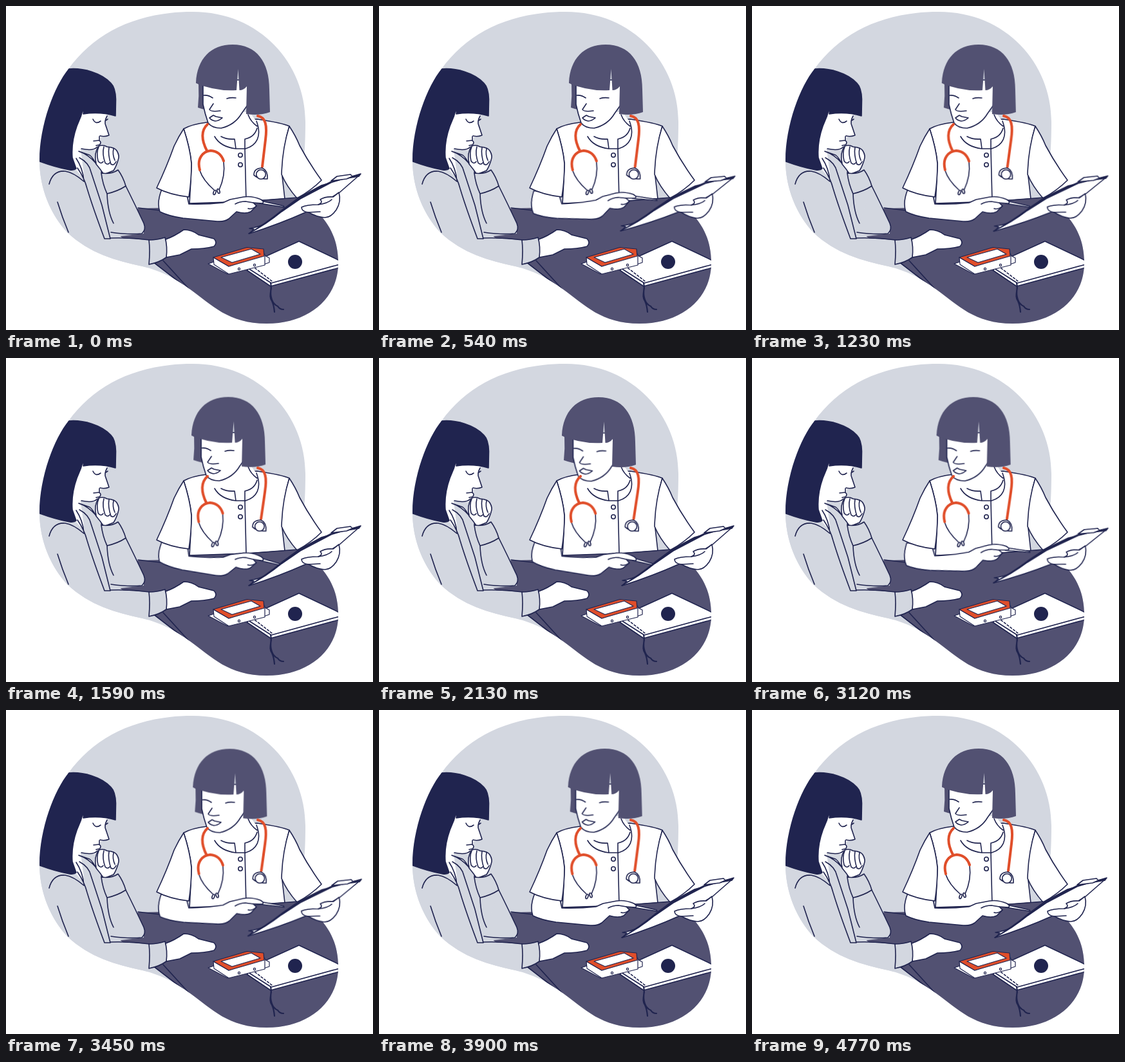
Recreate the animation shown at these times as an HTML page. Size 570 by 504 pixels, loop 4.8 s.

```html
<!DOCTYPE html>
<html lang="en">
<head>
<meta charset="utf-8">
<title>Consultation</title>
<style>
html, body { margin: 0; width: 100%; height: 100%; overflow: hidden; background: #fff; }
svg { display: block; width: 570px; height: 504px; }
.line { fill: none; stroke: #20244f; stroke-width: 1.6; stroke-linecap: round; stroke-linejoin: round; }
.white { fill: #fff; }
.grey { fill: #d3d7e0; }
.navy { fill: #20244f; }
.slate { fill: #525172; }
.red { fill: #e04e2a; }
.tube { stroke: #e04e2a; stroke-width: 4; }
.cord { stroke-width: 2.2; }
.thin { stroke-width: 1.2; }
.bare { stroke: none; }
#tubeL { transform-origin: 313px 184px; }
#tubeR { transform-origin: 392px 171px; }
#arm { transform-origin: 280px 310px; }
#board { transform-origin: 470px 305px; }
</style>
</head>
<body>
<svg viewBox="0 0 570 504">
  <defs>
    <path id="blobShape" d="M290 9C395 9 465 90 465 180C465 220 463 250 455 295C482 318 516 342 516 400C516 455 470 494 405 494C345 494 320 465 285 440C260 422 240 412 212 405C170 396 130 385 95 352C70 325 52 285 52 240C52 185 75 125 97 98C139 40 205 9 290 9Z"/>
    <clipPath id="blob"><use href="#blobShape"/></clipPath>
  </defs>
  <use href="#blobShape" class="grey"/>

  <!-- nurse: body -->
  <g class="line">
    <path class="white" d="M312 181Q288 184 276 191Q286 222 288 245Q287 275 285 308L375 304L433 300L429 265Q430 220 440 187Q430 182 390 176Z"/>
    <path class="white" d="M440 187Q450 202 456 217Q471 245 490 271Q474 287 452 299Q436 281 428 262Q429 222 440 187Z"/>
    <path class="white bare" d="M320 180L330 165H378L391 182Q392 203 372 208L335 203Z"/>
    <path d="M324 203Q333 219 357 222H372C389 217 398 203 389 179M334 203Q343 208 355 207L357 222M371 207Q386 204 390 190M371 207L371 222L373 304M376 169Q380 180 390 187"/>
    <circle cx="364" cy="232" r="3.2"/>
    <circle cx="364" cy="247" r="3.2"/>
  </g>

  <!-- table -->
  <g clip-path="url(#blob)">
    <path class="slate" d="M205 315L240 314L285 307L375 304L450 298L520 320V504H290L282 441L226 397L170 352Z"/>
    <path class="line" d="M205 314L240 318M285 307L375 304L452 298M227 397L284 441M244 396L284 440"/>
  </g>

  <!-- bag -->
  <g class="line" clip-path="url(#blob)">
    <path class="white" d="M374 411L400 391L455 366L518 396V407L411 436Z"/>
    <path d="M376 408L412 431L518 402"/>
    <path stroke-dasharray="3 3" d="M382 404L413 428"/>
    <path class="cord" d="M411 431C414 442 407 450 413 459Q416 465 417 476M412 438C409 452 414 464 422 467Q425 472 431 472"/>
    <circle class="navy bare" cx="449" cy="398" r="11"/>
  </g>

  <!-- device -->
  <g class="line thin">
    <path class="white" d="M314 401L323 398L347 413L344 417ZM398 386L409 392V399L400 402Z"/>
    <path class="white" d="M322 391L346 405L402 386V403L346 417L323 402Z"/>
    <path class="red" d="M322 391L374 375.5L400 378L401 389L346 405Z"/>
    <path class="white" d="M334 391L381 378L395 386L351 399Z"/>
    <circle cx="362" cy="409" r="1.6"/>
    <circle cx="386" cy="403" r="1.6"/>
  </g>

  <!-- nurse: writing arm -->
  <g id="arm" class="line">
    <path class="white" d="M395 303L431 311L432 313L394 307Z"/>
    <path class="white" d="M242 285C236 300 236 312 239 320Q253 327 275 330L328 335Q339 336 346 331L358 320Q372 324 380 320L389 311L384 306L398 307Q402 305 396 301Q382 295 369 297L348 301L337 306Q310 309 284 308L280 290Z"/>
    <path d="M384 306L372 304Q363 304 356 308M389 311Q382 317 376 315"/>
  </g>
  <path class="line white" d="M276 191Q268 203 261 218Q250 249 234 283Q255 294 284 297Q288 272 288 245Q286 222 276 191Z"/>

  <!-- nurse: head -->
  <path class="hair slate" d="M295 118H325V164Q312 163 298 158Q300 140 299 122Z"/>
  <g id="face" class="line">
    <path class="white" d="M306 115V153Q309 168 314 182Q320 190 334 190C347 187 359 179 366 167L378 150V115Z"/>
    <path d="M307 139Q314 138 321 143M343 144Q349 142 357 143M322 152L316 161Q318 165 333 163M316 174L322 170L326 172L336 174Q330 179 325 179Q319 178 316 174Z"/>
  </g>
  <path class="hair slate" d="M295 119C297 82 318 60 352 60C389 60 409 87 409 130L410 165Q394 171 373 168L374 125Q369 131 362.5 131L360.5 98L358 131Q325 133 295 120Z"/>

  <!-- stethoscope -->
  <g id="tubeL" class="line">
    <path d="M301 256Q306 271 323 286M338 242Q341 264 331 286"/>
    <ellipse class="white" cx="324" cy="290" rx="1.8" ry="3.6" transform="rotate(20 324 290)"/>
    <ellipse class="white" cx="330" cy="288" rx="1.8" ry="3.6" transform="rotate(-20 330 288)"/>
    <path class="tube" d="M313 184C303 193 303 208 312 225M301 255C296 237 306 226 318 225Q333 226 338 241"/>
  </g>
  <g id="tubeR" class="line">
    <path class="tube" d="M391 171C403 173 406 185 403 208L398 250"/>
    <path class="white" d="M385 263Q385 252 398 252Q407 256 406 269L401 269L389 266Z"/>
    <circle class="white" cx="396" cy="262" r="7.3"/>
  </g>

  <!-- clipboard -->
  <g id="board" class="line">
    <path class="white" d="M378 346Q393 344 403 338L455 299L513 269L549 263L517 291L465 321Q425 339 378 354L385 347Z"/>
    <path class="navy" d="M377 354Q405 337 428 318L455 298L490 279L551 261L548 265L512 271L457 300L428 320Q405 339 377 354Z"/>
    <path class="white" d="M505 272L514 265L535 262L538 265L529 269Z"/>
    <path class="white" d="M459 313Q467 309 485 309Q493 306 488 301Q496 296 508 297L517 290Q521 304 513 317Q504 330 494 329Q482 328 470 321Q459 320 459 313Z"/>
    <path d="M470 321L488 320M485 309Q500 307 506 301"/>
  </g>

  <!-- patient -->
  <g class="line" clip-path="url(#blob)">
    <path class="grey bare" d="M40 235L114 235L150 262L186 280L214 338L214 354L160 360L223 364V404L212 420H40Z"/>
    <path class="white bare" d="M119 155L158 168L153 184L160 201L147 204L146 217L139 224L116 223L122 270L109 255L98 225Z"/>
    <path d="M157 171Q152 180 155 186L160 201Q153 204 146 202M145 203V209L136 210M145 209Q149 213 145 216L140 217M142 219Q136 226 117 222M135 176Q139 185 147 179M155 178L158 176"/>
    <path class="navy" d="M40 98H97C120 96 148 104 163 120Q170 127 170.5 145L170 171Q146 164 120 168L121 156Q117 172 110 187Q101 212 103 236L109 253Q106 256 99 255Q72 250 40 237Z"/>
    <path d="M67 277C71 262 80 256 92 257Q105 259 121 273M80 305Q87 328 97 352M109 237Q119 252 121 271M114 236Q129 244 132 258L149 310L162 362M111 252Q122 268 126 284Q135 314 153 362H162"/>
    <path class="grey" d="M148 258L157 292Q158 321 167 338M186 280Q198 304 214 338Q218 348 211 354Q190 356 163 352"/>
    <path d="M162 361Q193 360 223 364"/>
  </g>
  <g class="line">
    <path class="white" d="M113 226Q128 231 140 245Q136 229 144 218Q150 215 157 219Q169 220 172 225Q177 233 174 240Q171 250 167 256L152 262Q146 253 140 246Q135 236 130 232Z"/>
    <path d="M144 219Q140 228 143 241Q147 247 151 242M152 219Q149 230 154 244Q158 248 161 244M160 220Q158 231 163 246Q168 249 171 242M167 222Q165 231 169 240"/>
    <path class="grey" d="M148 260Q164 262 174 255Q182 266 186 280Q174 288 157 292Q150 277 148 260Z"/>
    <path class="white" d="M248 363Q262 358 276 348Q289 348 299 356L323 362Q329 368 323 374Q308 378 288 378L270 387L249 391Z"/>
    <path class="grey" d="M222 364Q235 364 247 360Q251 374 249 391Q238 399 222 402Q224 380 222 364Z"/>
  </g>
</svg>
<script>
const LOOP = 4800;
const SOFT = 'cubic-bezier(.37, 0, .63, 1)';
const turn = a => `rotate(${a}deg)`;
const shift = k => `translate(${-11 * k}px, ${k}px)`;
const nudge = k => `translate(${-4.6 * k}px, ${1.6 * k}px)`;

// steps: [time in ms, value, easing towards the next step]
function play(selector, pose, steps) {
  const frames = steps.map(([ms, value, easing = SOFT]) =>
    ({ offset: ms / LOOP, transform: pose(value), easing }));
  for (const part of document.querySelectorAll(selector))
    part.animate(frames, { duration: LOOP, iterations: Infinity });
}

const head = [[0, 0], [1150, 0, 'cubic-bezier(.4, 0, .3, 1)'], [2130, 1],
  [2200, 1, 'cubic-bezier(.6, 0, .3, 1)'], [4750, 0], [LOOP, 0]];

play('.hair', shift, head);
play('#face', nudge, head);
play('#tubeL, #tubeR', turn, [[0, 0], [2400, 1.8], [LOOP, 0]]);
play('#arm', turn, [[0, 0], [600, -4], [850, -4], [1600, 4], [2190, 4],
  [2800, -4], [3200, -4], [3780, 0], [LOOP, 0]]);
play('#board', turn, [[0, 0], [600, 2.6], [1110, 2.6], [1620, 0], [2190, 0],
  [2800, 2.6], [3200, 2.6], [3780, 0], [LOOP, 0]]);
</script>
</body>
</html>
```
